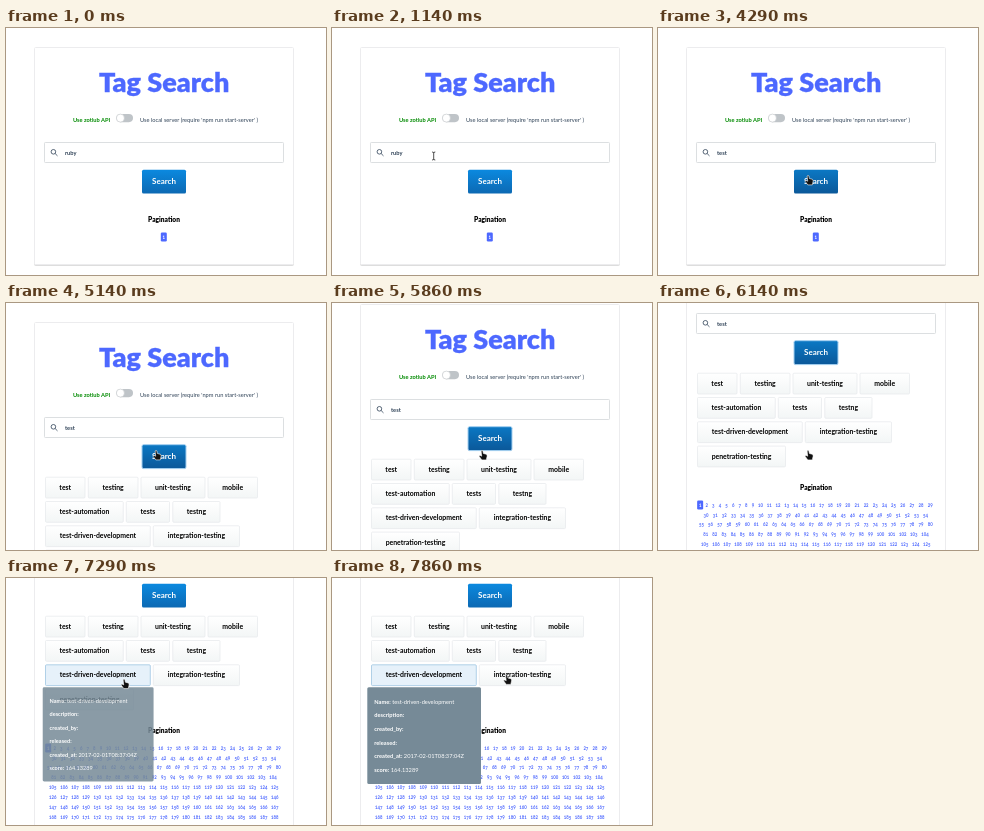
An HTML page that plays this animation: 320 px wide and 247 px high, repeating every 8 s.

```html
<!DOCTYPE html>
<html lang="en">
<head>
<meta charset="utf-8">
<title>Tag Search</title>
<style>
  html, body { margin: 0; height: 100%; overflow: hidden; background: #fff; }
  svg { display: block; width: 100vw; height: 100vh; font-family: Lato, "Open Sans", sans-serif; font-size: 5.7px; }
  .bold { font-weight: 700; }
  .title { font-size: 27px; font-weight: 900; fill: #4d68ff; stroke: #4d68ff; stroke-width: .3; }
  .card { fill: #fff; stroke: #ececee; filter: drop-shadow(0 1px .6px #0002); }
  .pages { font-size: 4.6px; font-weight: 700; fill: #4d68ff; font-variant-numeric: oldstyle-nums; }
  .tag { font-size: 6.9px; font-weight: 700; }
  .mid { text-anchor: middle; }
  .cursor { fill: #111; stroke: #fff; stroke-width: .6; }
</style>
</head>
<body>
<svg id="stage" viewBox="0 0 320 247">
  <defs>
    <linearGradient id="blue" x2="0" y2="1"><stop stop-color="#0b89df"/><stop offset="1" stop-color="#0c69b3"/></linearGradient>
    <linearGradient id="darkBlue" x2="0" y2="1"><stop stop-color="#0b78c4"/><stop offset="1" stop-color="#0b5899"/></linearGradient>
    <linearGradient id="pale" x2="0" y2="1"><stop stop-color="#fff"/><stop offset="1" stop-color="#f3f6f6"/></linearGradient>
  </defs>
  <g id="scene"></g>
</svg>
<script>
const LOOP = 8000, STEP = 1000 / 7, BLUE = '#4d68ff', INK = '#2f4257';
const scene = document.getElementById('scene');

// Tags as [label, left, right], one list per row
const TAG_ROWS = [
  [['test', 39.5, 79], ['testing', 82.3, 132], ['unit-testing', 135, 199], ['mobile', 202, 251.5]],
  [['test-automation', 39.5, 117.3], ['tests', 120.3, 163.5], ['testng', 166.8, 214]],
  [['test-driven-development', 39.5, 144.3], ['integration-testing', 147.3, 233.5]],
  [['penetration-testing', 39.5, 127.5]],
];
const PAGE_ROW_STARTS = [1, 30, 55, 81, 105, 126, 147, 168, 189];
const DETAILS = [
  ['Name', 'test-driven-development'], ['description', ''], ['created_by', ''],
  ['released', ''], ['created_at', '2017-02-01T08:37:04Z'], ['score', '164.13289'],
];

const text = (s, x, y, attrs = '') => `<text x="${x}" y="${y}" ${attrs}>${s}</text>`;
const rect = (x, y, w, h, attrs = '') => `<rect x="${x}" y="${y}" width="${w}" height="${h}" ${attrs}/>`;

// Linear interpolation through [step, ...values] keys
function track(k, keys) {
  const i = keys.findIndex(key => key[0] > k);
  if (i < 0) return keys[keys.length - 1].slice(1);
  if (i === 0) return keys[0].slice(1);
  const a = keys[i - 1], b = keys[i], f = (k - a[0]) / (b[0] - a[0]);
  return a.slice(1).map((v, j) => v + (b[j + 1] - v) * f);
}

function header() {
  return text('Tag Search', 158.2, 63.9, 'class="mid title"')
    + text('Use zotlub API', 67, 93.8, 'class="bold" fill="#008a00"')
    + rect(110.3, 86, 16.7, 8.2, 'rx="4.1" fill="#bfc4c8"')
    + '<circle cx="114.4" cy="90.1" r="4" fill="#fff" stroke="#c4c8cb" stroke-width=".6"/>'
    + text("Use local server (require 'npm run start-server' )", 134, 93.8, `fill="${INK}"`);
}

function searchBox(k) {
  const focused = k >= 10 && k < 27;
  const value = k < 18 ? 'ruby' : k < 19 ? 't' : k < 20 ? 'tes' : 'test';
  const caretX = { t: 61.4, tes: 66.6, test: 68.8 }[value];
  const selected = k >= 11 && k < 18;
  return rect(38.5, 114.5, 239, 20, `rx=".8" fill="#fff" stroke="${focused ? '#86bce6' : '#dcdfe1'}"`)
    + `<g fill="none" stroke="${INK}" stroke-width=".8"><circle cx="47.4" cy="123.8" r="2.3"/><path d="M49.1 125.5l2.4 2.4"/></g>`
    + (selected ? rect(58.6, 119.5, 11.6, 10.3, 'fill="#b4d5fe"') : '')
    + text(value, 59, 126.7, `class="bold" fill="${INK}"`)
    + (k >= 18 && k < 24 ? rect(caretX, 120, .6, 9, 'fill="#333"') : '')
    + (focused ? '<path d="M266.5 123.2l3 3m0-3l-3 3" stroke="#26456b" stroke-width="1"/>' : '');
}

function button(k) {
  const active = k >= 30 && k < 49, ring = k >= 31 && k < 49;
  return rect(136, 141.7, 44, 23.9, `rx="1.5" fill="url(#${active ? 'darkBlue' : 'blue'})"${ring ? ' stroke="#a3cff0"' : ''}`)
    + text('Search', 158, 156.3, 'class="mid bold" font-size="8" fill="#fff"');
}

function tags(k) {
  return TAG_ROWS.map((row, r) => row.map(([label, x0, x1]) => {
    const y = 174.2 + r * 24.3;
    const lit = k >= 49 && label === 'test-driven-development';
    return rect(x0, y, x1 - x0, 20.8, `rx="1" fill="${lit ? '#e6f1fa' : 'url(#pale)'}" stroke="${lit ? '#94bfdf' : '#e6e9eb'}" stroke-width=".7"`)
      + text(label, (x0 + x1) / 2, y + 12.5, 'class="mid tag"');
  }).join('')).join('');
}

const pageWidth = n => n < 10 ? 6.6 : n < 20 ? 8.7 : n < 100 ? 9.15 : 11.1;

function pageRow(first, last, y) {
  let total = 0, out = '';
  for (let n = first; n <= last; n++) total += pageWidth(n);
  let x = 157.8 - total / 2;
  for (let n = first; n <= last; n++) {
    const w = pageWidth(n), cx = x + w / 2;
    if (n === 1) out += rect(cx - 3, y - 6, 6, 8.9, `rx="1.2" fill="${BLUE}"`);
    out += text(n, cx, y, `class="mid"${n === 1 ? ' fill="#fff"' : ''}`);
    x += w;
  }
  return out;
}

function pagination(loaded) {
  const top = loaded ? 290.7 : 193.7;
  const starts = loaded ? PAGE_ROW_STARTS : [1, 2];
  const rows = starts.slice(0, -1).map((n, i) =>
    pageRow(n, starts[i + 1] - 1, top + 16.9 + i * 9.93));
  return text('Pagination', 158, top, 'class="mid" font-size="6.6" font-weight="900"')
    + `<g class="pages">${rows.join('')}</g>`;
}

function tooltip(k) {
  if (k < 51) return '';
  const [scale, alpha] = track(k, [[51, .975, .85], [52, 1, 1]]);
  const lines = DETAILS.map(([name, value], i) =>
    text(`<tspan class="bold">${name}:</tspan> ${value}`, 42.3, 125.5 + i * 13.7));
  return `<g transform="translate(92 109.3) scale(${scale}) translate(-92 -109.3)" opacity="${alpha}" fill="#fff">`
    + rect(35.3, 109.3, 113.7, 96.7, 'rx="1.5" fill="#768a97"') + lines.join('') + '</g>';
}

const POINTERS = {
  arrow: '<path d="M0 0V9.2L2.1 7.2 3.5 10.3 5 9.6 3.6 6.6H6.5Z"/>',
  beam: '<path d="M-1.6-4Q0-4 0-3V3Q0 4-1.6 4M1.6-4Q0-4 0-3M0 3Q0 4 1.6 4" fill="none" style="stroke:#222;stroke-width:.8"/>',
  hand: '<path d="M-.9 .7Q0-.6 .9 .6L1.4 3.2 4.2 3.9Q5.4 4.3 5.1 6L4.3 9.6H-.2L-2.9 6Q-2.7 4.6-1.2 5.4L-.3 5.9Z"/>',
};

function cursor(k) {
  if (k < 2) return '';
  const [x, y] = track(k, [
    [2, 263, 8], [4, 205, 52], [6, 135, 104], [8, 101.7, 128], [25, 101.7, 128],
    [26, 118, 133], [28, 149.5, 145.5], [30, 150, 147.3], [45, 150, 147.3],
    [48, 121, 105], [49, 118, 101], [52, 118, 101], [55, 174.5, 96.8],
  ]);
  const kind = k < 7 ? 'arrow' : k < 27 ? 'beam' : 'hand';
  return `<g class="cursor" transform="translate(${x} ${y})">${POINTERS[kind]}</g>`;
}

function draw(k) {
  const loaded = k >= 36;
  const [scroll] = track(k, [[40, 0], [41, 18], [42, 60], [43, 104], [44, 128], [45, 136]]);
  scene.innerHTML = `<g transform="translate(0 ${-scroll})">`
    + rect(28.5, 19.5, 259, loaded ? 420 : 217, 'rx="1" class="card"')
    + header() + searchBox(k) + button(k)
    + (loaded ? tags(k) : '') + pagination(loaded)
    + '</g>' + tooltip(k) + cursor(k);
}

let shown = -1;
function tick() {
  const k = Math.floor((performance.now() % LOOP + 3) / STEP) % 56;
  if (k !== shown) draw(shown = k);
  requestAnimationFrame(tick);
}
tick();
</script>
</body>
</html>
```
